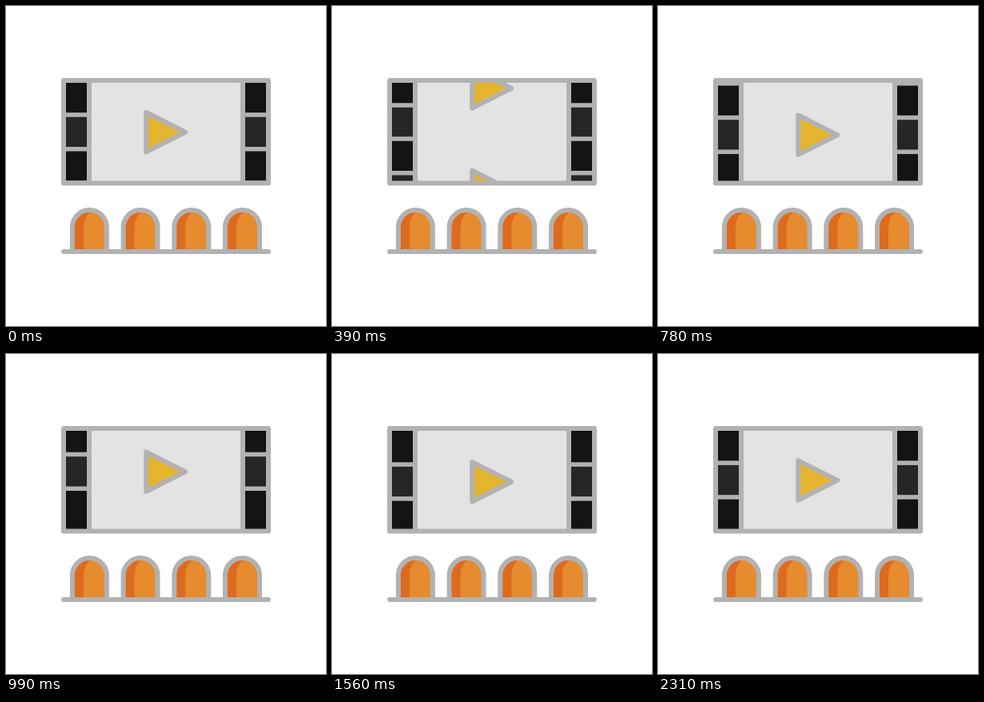
Recreate the animation shown at these times as an HTML page with a canvas. Size 400 by 400 pixels, loop 4.43 s.

```html
<!DOCTYPE html>
<html lang="en">
<head>
<meta charset="utf-8">
<title>Cinema</title>
<style>
html, body { margin: 0; width: 100%; height: 100%; overflow: hidden; background: #fff; }
canvas { display: block; width: 400px; height: 400px; }
</style>
</head>
<body>
<canvas id="stage" width="400" height="400"></canvas>
<script>
const ctx = document.getElementById('stage').getContext('2d');
const LOOP = 4430, STEP = 30;
const GREY = '#b2b2b2', DARK = '#141414', SOFT = '#262626';
const PANELS = [
  { y: 0, top: 93.3, outer: DARK, inner: SOFT },
  { y: 130.5, top: 90.5, outer: SOFT, inner: DARK },
  { y: 258, top: 93.3, outer: DARK, inner: SOFT }
];
const END = PANELS[2].y;
const KEYS = [
  { t: 0, v: 0, ease: [0.16, 0.065] },
  { t: 1260, v: END + 16, ease: [0.33, 0.67] },
  { t: 1800, v: END - 15, ease: [0.33, 0.67] },
  { t: 2340, v: END }
];

// Cubic bezier easing with flat ends: (x1, 0, x2, 1)
function bezier(x, [x1, x2]) {
  let lo = 0, hi = 1;
  for (let i = 0; i < 30; i++) {
    const s = (lo + hi) / 2, r = 1 - s;
    if (3 * s * r * r * x1 + 3 * s * s * r * x2 + s * s * s < x) lo = s;
    else hi = s;
  }
  return lo * lo * (3 - 2 * lo);
}

function scrollAt(t) {
  for (let i = 1; i < KEYS.length; i++) {
    const a = KEYS[i - 1], b = KEYS[i];
    if (t < b.t) return a.v + (b.v - a.v) * bezier((t - a.t) / (b.t - a.t), a.ease);
  }
  return END;
}

function box(color, x, y, w, h) {
  ctx.fillStyle = color;
  ctx.fillRect(x, y, w, h);
}

function line(x1, y1, x2, y2) {
  ctx.beginPath();
  ctx.moveTo(x1, y1);
  ctx.lineTo(x2, y2);
  ctx.stroke();
}

function panel(p, y, alone) {
  const top = alone ? 90 : y + p.top;
  for (const x of [72, 296]) {
    box(p.outer, x, top, 32, 400);
    box(p.inner, x, y + 136, 32, 42.8);
    for (const d of [p.top, 136, 178.8]) {
      if (d !== p.top || !alone) box(GREY, x, y + d - 2.75, 32, 5.5);
    }
  }
  ctx.beginPath();
  ctx.moveTo(175.2, y + 133);
  ctx.lineTo(224.2, y + 157.7);
  ctx.lineTo(175.2, y + 182.4);
  ctx.closePath();
  ctx.fillStyle = '#e6b52e';
  ctx.fill();
  ctx.stroke();
}

function screen(t) {
  const scroll = scrollAt(t);
  const alone = t > 900 || scroll > END;
  ctx.save();
  ctx.beginPath();
  ctx.rect(72, 93, 256, 128.5);
  ctx.clip();
  box('#e3e3e3', 72, 93, 256, 129);
  for (const p of alone ? [PANELS[2]] : PANELS) panel(p, p.y - scroll, alone);
  ctx.restore();
  line(104, 93, 104, 221);
  line(296, 93, 296, 221);
  ctx.strokeRect(72, 93, 256, 128.5);
}

function arch(x, r, top, base) {
  ctx.beginPath();
  ctx.moveTo(x - r, base);
  ctx.lineTo(x - r, top + r);
  ctx.arc(x, top + r, r, Math.PI, 0);
  ctx.lineTo(x + r, base);
}

function seat(x) {
  arch(x, 21.5, 255, 306);
  ctx.fillStyle = '#de6a1e';
  ctx.fill();
  ctx.save();
  ctx.clip();
  ctx.beginPath();
  ctx.moveTo(x - 7.5, 306);
  ctx.lineTo(x - 7.5, 277);
  ctx.bezierCurveTo(x - 7.5, 268, x - 4, 261, x + 2, 257);
  ctx.lineTo(x + 30, 250);
  ctx.lineTo(x + 30, 306);
  ctx.fillStyle = '#e78b2f';
  ctx.fill();
  ctx.restore();
  arch(x, 21.5, 255, 306);
  ctx.stroke();
}

function draw(t) {
  box('#fff', 0, 0, 400, 400);
  ctx.strokeStyle = GREY;
  ctx.lineWidth = 6;
  ctx.lineJoin = ctx.lineCap = 'round';
  screen(t);
  for (let i = 0; i < 4; i++) seat(104.4 + i * 63.7);
  line(72, 307, 328, 307);
}

const start = performance.now();
function tick() {
  const t = (performance.now() - start) % LOOP;
  draw(Math.floor(t / STEP) * STEP);
  requestAnimationFrame(tick);
}
tick();
</script>
</body>
</html>
```
